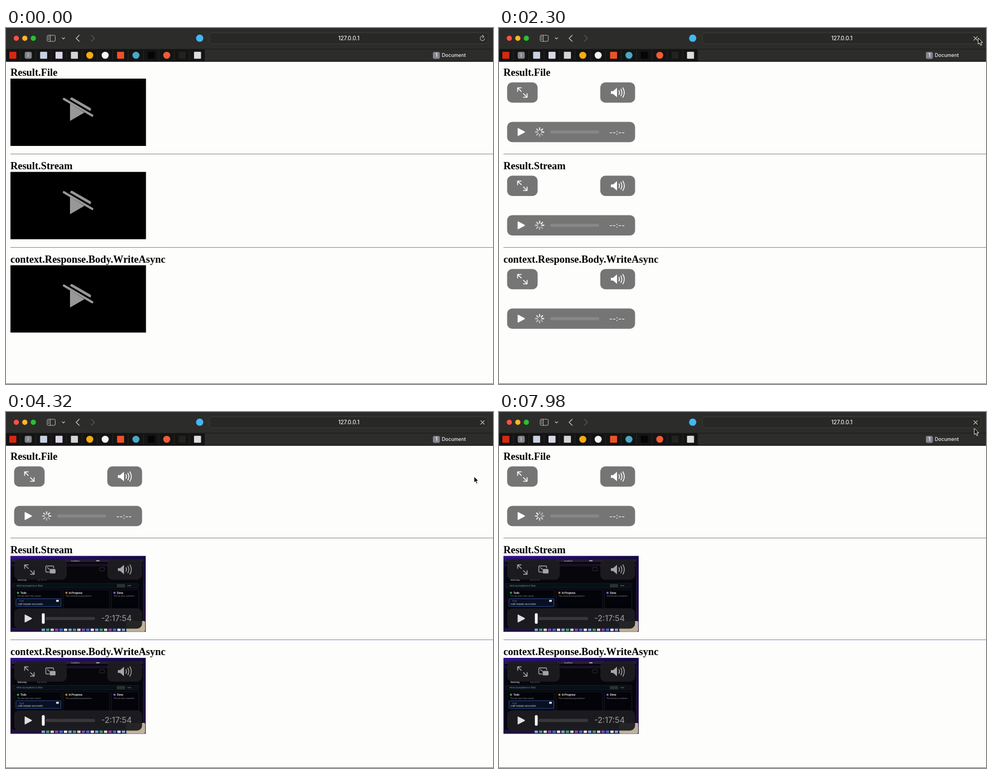
Recreate the animation shown at these times as an HTML page. Size 875 px wide and 640 px high, loop 8000 ms.

```html
<!DOCTYPE html>
<html lang="en">
<head>
<meta charset="utf-8">
<title>Video loading</title>
<style>
  html, body { margin: 0; width: 100%; height: 100%; overflow: hidden; background: #fdfdfc; }
  svg { display: block; width: 875px; height: 640px; font-family: Inter, Roboto, sans-serif; }
  .heading { font: bold 18.42px "Liberation Serif", "Times New Roman", serif; }
  .line { fill: none; stroke-linecap: round; stroke-linejoin: round; }
</style>
</head>
<body>
<svg viewBox="0 0 875 640">
  <defs>
    <linearGradient id="wallpaper" x2=".2" y2="1">
      <stop stop-color="#34128f"/><stop offset=".2" stop-color="#150a40"/><stop offset="1" stop-color="#21103f"/>
    </linearGradient>
    <g id="broken">
      <rect x="8" width="243.5" height="121"/>
      <path fill="#989898" d="M115 45L141 61L115 76ZM115 36L118 33.500L152 53Q154 56 151 58L115 37Z"/>
      <path class="line" stroke="#989898" stroke-width="4" d="M104 36.500L155 66.500"/>
    </g>
    <g id="expand" class="line" stroke-width="1.6">
      <path d="M40 16L34 10M33.500 16V9.500H40M44 20L50 26M50.500 20V26.500H44"/>
    </g>
    <g id="volume">
      <path d="M201 15.500H205L212 9.500V26.500L205 20.500H201Z"/>
      <path class="line" stroke-width="1.5" d="M215.500 14.500Q217.500 18 215.500 21.500M219 12Q222.500 18 219 24M222.500 9.500Q228 18 222.500 26.500"/>
    </g>
    <g id="pip">
      <path class="line" stroke-width="1.4" d="M77 22.500H73Q71.500 22.500 71.500 21V13Q71.500 11.500 73 11.500H84Q85.500 11.500 85.500 13V15M74.500 14.500L78 17.500"/>
      <rect x="78.500" y="17" width="10.500" height="8" rx="1.500"/>
    </g>
    <path id="play" d="M33.500 11.500Q33.500 10.500 34.500 11L46 17Q47 18 46 19L34.500 25Q33.500 25.500 33.500 24.500Z"/>
    <g id="poster"></g>
  </defs>
  <g id="chrome"></g>
  <g id="page"></g>
  <path id="cursor" fill="#000" stroke="#f4f4f4" stroke-width="1" stroke-linejoin="round"
    d="M0 0V11L2.500 8.700L4.300 13L6.300 12.200L4.500 8H8Z"/>
</svg>
<script>
const LOOP = 8000;
const RELOAD_AT = 860, CONTROLS_AT = 940;
const BAR_FULL_AT = 1880, BAR_FADE = 200;
const BODY_AT = 3340, STREAM_AT = 3720, METADATA_DELAY = 180;
const SPIN_PERIOD = 1000;
const CURSOR_PATH = [[60, 878, 110], [720, 861, 18], [2480, 861, 18], [3280, 864, 185], [4080, 864, 185],
  [4320, 841, 116], [4840, 850, 35], [5500, 850, 35], [5750, 854, 29.5]];
const el = id => document.getElementById(id);

const rect = (x, y, w, h, fill, rx = 0, extra = '') =>
  `<rect x="${x}" y="${y}" width="${w}" height="${h}" rx="${rx}" fill="${fill}" ${extra}/>`;
const disc = (x, y, r, fill) => `<circle cx="${x}" cy="${y}" r="${r}" fill="${fill}"/>`;
const line = (d, stroke, width = 1) => `<path class="line" d="${d}" stroke="${stroke}" stroke-width="${width}"/>`;
const text = (x, y, size, fill, label, extra = '') =>
  `<text x="${x}" y="${y}" font-size="${size}" fill="${fill}" ${extra}>${label}</text>`;
const shift = (y, content) => `<g transform="translate(0 ${y})">${content}</g>`;
const use = id => `<use href="#${id}"/>`;

function drawChrome() {
  let out = rect(0, 0, 875, 60, '#2c2c2a') + rect(0, 38, 357, 22, '#141414')
    + rect(0, 37.5, 875, 1, '#1b1b1a') + rect(0, 59.5, 875, 1.2, '#0b0b0b') + rect(0, 639, 875, 1, '#777');
  ['#ff4f48', '#fdb528', '#2ac033'].forEach((c, i) => out += disc(18.5 + 15.3 * i, 18.5, 4.7, c));
  out += rect(74, 13, 14.5, 11, 'none', 2, 'stroke="#b5b5b5"') + line('M79.5 13V24M76 15.500H77.500M76 18H77.500M76 20.500H77.500', '#b5b5b5')
    + line('M101 17.500L103.200 19.700L105.400 17.500', '#b5b5b5', 1.3)
    + line('M131.500 13L126 18.500L131.500 24', '#c0c0c0', 1.4)
    + line('M153.500 13L159 18.500L153.500 24', '#565656', 1.4)
    + disc(348, 18.3, 6.5, '#42b7f2')
    + rect(365.5, 8.5, 500.5, 20, '#282826', 5, 'stroke="#3d3d36"')
    + text(616, 22, 9.8, '#f2f2f2', '127.0.0.1', 'text-anchor="middle" font-weight="500"');

  const icons = ['#d9270d', '#85838a', '#c7d2e4', '#ddd6e8', '#d5d5d5', 'o#f5ac12', 'o#f4f4f4',
    '#ef5227', 'o#48a9c5', '#050505', 'o#ee5d32', '#20231e', '#dedede'];
  icons.forEach((icon, i) => {
    const x = 12.3 + 27.65 * i;
    out += icon[0] === 'o' ? disc(x, 49, 6.3, icon.slice(1)) : rect(x - 6.3, 42.7, 12.6, 12.6, icon, i === 1 ? 3 : 1);
    out += rect(x + 13, 40, 1, 18, '#292929');
  });
  out += text(40, 52.3, 9, '#eee', 'I', 'text-anchor="middle"')
    + rect(767, 43, 12.5, 12.5, '#87848d', 3)
    + text(773.2, 52.3, 8.5, '#fff', '1', 'text-anchor="middle" font-weight="600"')
    + text(783, 52.3, 8.8, '#eee', 'Document', 'font-weight="500"');
  el('chrome').innerHTML = out;
}

function drawPoster() {
  let out = rect(8, 0, 243, 136.5, 'url(#wallpaper)') + rect(10, 6, 236, 123, '#06060b', 2)
    + rect(10, 6, 236, 5, '#291c35') + rect(10, 14, 236, 5, '#181025')
    + text(117, 10, 3.5, '#ddd', 'localhost') + rect(162, 8, 6, 1.5, '#ccc')
    + text(21, 44.5, 4, '#ccc', 'Backlog', 'font-weight="700"') + text(56, 44.5, 4, '#777', 'My items')
    + rect(168, 21, 9, 6, 'none', 1, 'stroke="#444" stroke-width=".7"')
    + rect(12, 49.5, 226, 8, '#071019', 1, 'stroke="#18232c" stroke-width=".7"')
    + text(19, 55, 4, '#8b98a0', 'Filter by keyword or field')
    + rect(199, 50.5, 15, 6, '#29332f', 1) + rect(218, 52.5, 7, 2, '#444');
  [[16, 83, '#2da44e', 'Todo', 'This item hasn’t been started'],
   [103, 83, '#c77a24', 'In Progress', 'This is actively being worked on'],
   [189.5, 49, '#9258e0', 'Done', 'This has been completed']]
    .forEach(([x, w, color, title, note]) => {
      out += rect(x, 61, w, 66, '#03040a', 1, 'stroke="#20202b" stroke-width=".7"')
        + disc(x + 5.5, 66.3, 2, color) + text(x + 10, 67.9, 4.4, '#eee', title, 'font-weight="700"')
        + text(x + 4, 73.5, 3.1, '#9a9a9a', note);
    });
  out += rect(18, 77, 80.5, 14, '#081022', 1.5, 'stroke="#2a4c90" stroke-width="1"')
    + text(24, 82.5, 3.5, '#78869c', 'Draft') + text(21, 88, 3.7, '#ddd', 'Draft template documents')
    + rect(90, 79, 5, 3.5, '#ddd', 1) + rect(216, 117, 34, 19, '#bfb29a', 2);
  const dock = ['#7fa8dc', '#e8e8e8', '#3d70cb', '#8b4ba8', '#d2d6d0', '#41a46b'];
  for (let i = 0; i < 19; i++) out += rect(64 + 8 * i, 130, 6, 5, dock[i * 5 % 6], 1);
  el('poster').innerHTML = out;
}

// Each spoke flashes in turn and then fades continuously.
function spinner(t) {
  let out = '';
  for (let i = 0; i < 8; i++) {
    const age = (t / SPIN_PERIOD - i / 8 + 1) % 1;
    out += `<path class="line" d="M0 -4V-7.400" stroke="#fff" stroke-width="2.200" opacity="${1 - .65 * age}" transform="translate(73 18) rotate(${45 * i})"/>`;
  }
  return out;
}

// Controls sit over the poster once it has loaded; the duration arrives a little later.
function player(t, top, loadAt) {
  const loaded = t >= loadAt, ready = t >= loadAt + METADATA_DELAY;
  const panel = (x, w) => rect(x, -.2, w, 36.4, loaded ? '#1d1d20' : '#757575', 9, loaded ? 'opacity=".95"' : '');
  const ink = loaded ? '#a5a5a5' : '#fff';
  const icon = (id, strokeWidth) => `<g fill="${ink}" stroke="${ink}" stroke-width="${strokeWidth}">${use(id)}</g>`;
  const buttons = panel(14.6, loaded ? 94.6 : 54.8) + panel(182, 62.5)
    + icon('expand', 1) + icon('volume', 0) + (loaded ? icon('pip', 0) : '');
  const bar = panel(14.6, 229.9)
    + `<g fill="${loaded ? '#e0e0e0' : '#fff'}">${use('play')}</g>`
    + (ready ? '' : spinner(t))
    + rect(ready ? 71 : 92, 15.2, ready ? 89 : 88, 5.6, loaded ? '#38383b' : '#878787', 2.5)
    + (loaded ? rect(ready ? 64.5 : 86, 8.5, 5, 19, '#fff', 2) : '')
    + text(226, 22.7, ready ? 14.2 : 13, ready ? '#8d8d8f' : loaded ? '#aaa' : '#f2f2f2',
      ready ? '-2:17:54' : '--:--', 'text-anchor="end" font-weight="500"');
  return shift(top, (loaded ? use('poster') : '') + shift(loaded ? 6.5 : 7, buttons) + shift(loaded ? 94.5 : 78, bar));
}

function addressStatus(t) {
  if (t < RELOAD_AT)
    return line('M858.500 15.500A4 4 0 1 0 860 19M856 13L858.700 15.500L856 17.800', '#aaa', 1.1);
  const progress = Math.min(1, (t - RELOAD_AT) / (BAR_FULL_AT - RELOAD_AT));
  const opacity = Math.min(1, Math.max(0, 1 - (t - BAR_FULL_AT) / BAR_FADE));
  return line('M853 15.500L859.500 22M859.500 15.500L853 22', '#b5b5b5', 1.2)
    + rect(368, 27, 497 * progress, 2, '#168ce0', 1, `opacity="${opacity}"`);
}

function drawPage(t) {
  const pushed = t >= STREAM_AT, push = pushed ? 15.5 : 0;
  const heading = (y, label) => `<text class="heading" x="8" y="${y}">${label}</text>`;
  const video = (top, loadAt) => t < CONTROLS_AT ? shift(top, use('broken')) : player(t, top, loadAt);

  el('page').innerHTML = heading(86, 'Result.File') + video(91, Infinity) + rect(8, 226, 867, 1, '#898986')
    + heading(253.7, 'Result.Stream') + video(258.7, STREAM_AT)
    + rect(8, pushed ? 409 : 394, 867, 1, pushed ? '#8888ae' : '#898986')
    + heading(421.5 + push, 'context.Response.Body.WriteAsync') + video(426.5 + push, BODY_AT)
    + addressStatus(t);
}

function moveCursor(t) {
  const next = CURSOR_PATH.findIndex(p => p[0] > t);
  let [, x, y] = CURSOR_PATH[next < 0 ? CURSOR_PATH.length - 1 : Math.max(0, next - 1)];
  if (next > 0) {
    const [t0, x0, y0] = CURSOR_PATH[next - 1], [t1, x1, y1] = CURSOR_PATH[next];
    const k = (t - t0) / (t1 - t0), ease = k * k * (3 - 2 * k);
    x = x0 + (x1 - x0) * ease;
    y = y0 + (y1 - y0) * ease;
  }
  el('cursor').setAttribute('transform', `translate(${x} ${y})`);
}

function frame() {
  const t = performance.now() % LOOP;
  drawPage(t);
  moveCursor(t);
  requestAnimationFrame(frame);
}

drawChrome();
drawPoster();
frame();
</script>
</body>
</html>
```
